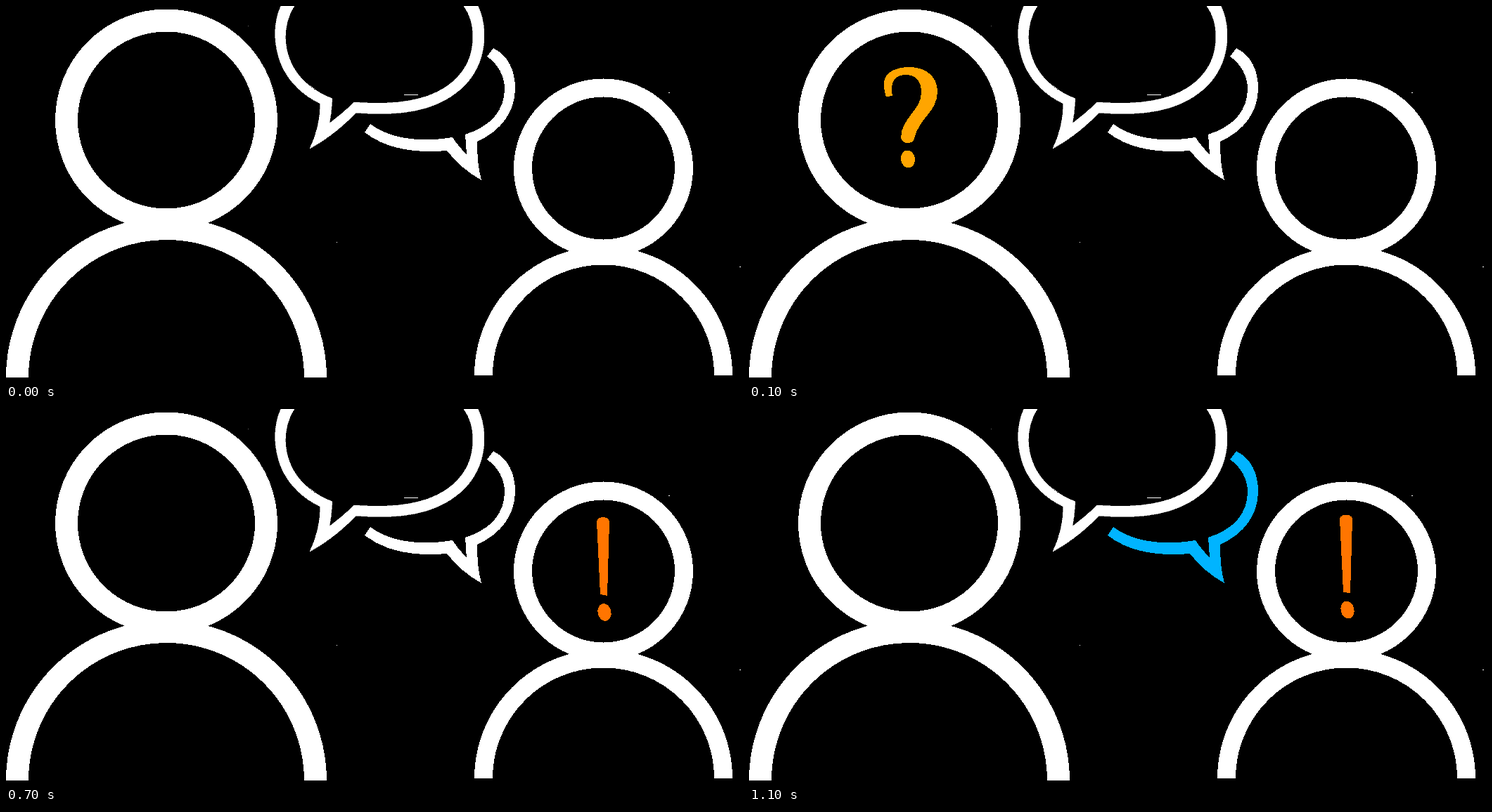
An HTML page for the animation above (1300 ms loop, 1048 by 534 pixels).

```html
<!DOCTYPE html>
<html lang="en">
<head>
<meta charset="utf-8">
<title>Question and answer</title>
<style>
  html, body { margin: 0; height: 100%; overflow: hidden; background: #000; }
  svg { display: block; width: 100%; height: 100%; shape-rendering: crispEdges; }
  .person { fill: none; stroke: #fff; }
</style>
</head>
<body>
<svg viewBox="0 0 1048 534">
  <g class="person" stroke-width="32">
    <circle cx="228" cy="162.5" r="142"/>
    <path d="M16 529A212 212 0 0 1 440 529"/>
  </g>
  <g class="person" stroke-width="26">
    <circle cx="849.5" cy="231" r="114.5"/>
    <path d="M679 526A170.5 170.5 0 0 1 1020 526"/>
  </g>

  <path id="askBubble" stroke="#fff" stroke-width=".6" d="M391 0C379 25 380 62 395 91
    C405 110 423 128 447 139C447 160 442 182 432 203C458 189 479 171 498 152
    C560 157 610 150 646 119C670 98 680 70 680 42C680 26 677 12 671 0H651
    C660 13 664 27 664 42C664 70 655 90 635 108C601 137 550 141 495 137
    C484 148 472 158 460 167C462 155 463 144 464 132C440 122 420 108 408 86
    C393 58 394 25 410 0Z"/>
  <path id="replyBubble" d="M693 60C715 71 724 93 724 118C724 150 704 178 670 193
    C670 212 671 230 676 248C658 238 641 224 627 206C590 209 545 207 510 180
    L518 168C548 191 595 194 635 187C641 196 647 204 655 211
    C654 202 654 193 653 183C690 171 709 148 709 118C709 99 699 82 684 72Z"/>

  <g id="question" fill="#ffa500">
    <path d="M195 129C192 122 192 115 192 109C193 95 208 87 228 87
      C253 87 268 102 268 121C268 152 242 158 235 189C233 197 218 198 216 188
      C216 160 245 148 245 124C245 106 237 98 223 98C209 98 200 106 204 128Z"/>
    <ellipse cx="226" cy="218" rx="10" ry="12.5" transform="rotate(-10 226 218)"/>
  </g>
  <g id="exclamation" fill="#ff7500">
    <path d="M840 160C841 152 857 152 858 160L855 266L845 264Z"/>
    <ellipse cx="851" cy="289.5" rx="9.5" ry="12.5" transform="rotate(-12 851 289.5)"/>
  </g>

  <path fill="#fff" d="M566 126h20v1h-20zM470 336h1v1h-1zM942 123h2v1h-2zM1043 371h2v1h-2z"/>
  <path fill="#666" d="M344 28h1v1h-1z"/>
  <path id="glint" fill="#fff" d="M648 111L653 104L655 106L650 111Z"/>
</svg>
<script>
  const LOOP = 1300;
  const el = id => document.getElementById(id);
  const [askBubble, replyBubble, question, exclamation, glint] =
    ['askBubble', 'replyBubble', 'question', 'exclamation', 'glint'].map(el);

  function showMark(mark, visible, offset) {
    mark.setAttribute('visibility', visible ? 'visible' : 'hidden');
    mark.setAttribute('transform', `translate(0 ${offset})`);
  }

  function draw(now) {
    const t = now % LOOP;
    const asking = t >= 200 && t < 700;
    const replying = t >= 800;
    showMark(question, t >= 100 && t < 700, asking ? 5.5 : 0);
    showMark(exclamation, t >= 700, replying ? -3.5 : 0);
    showMark(glint, asking, 0);
    askBubble.setAttribute('fill', asking ? '#f00' : '#fff');
    replyBubble.setAttribute('fill', replying ? '#00b4ff' : '#fff');
  }

  let start;
  function tick(now) {
    start ??= now;
    draw(now - start);
    requestAnimationFrame(tick);
  }
  draw(0);
  requestAnimationFrame(tick);
</script>
</body>
</html>
```
